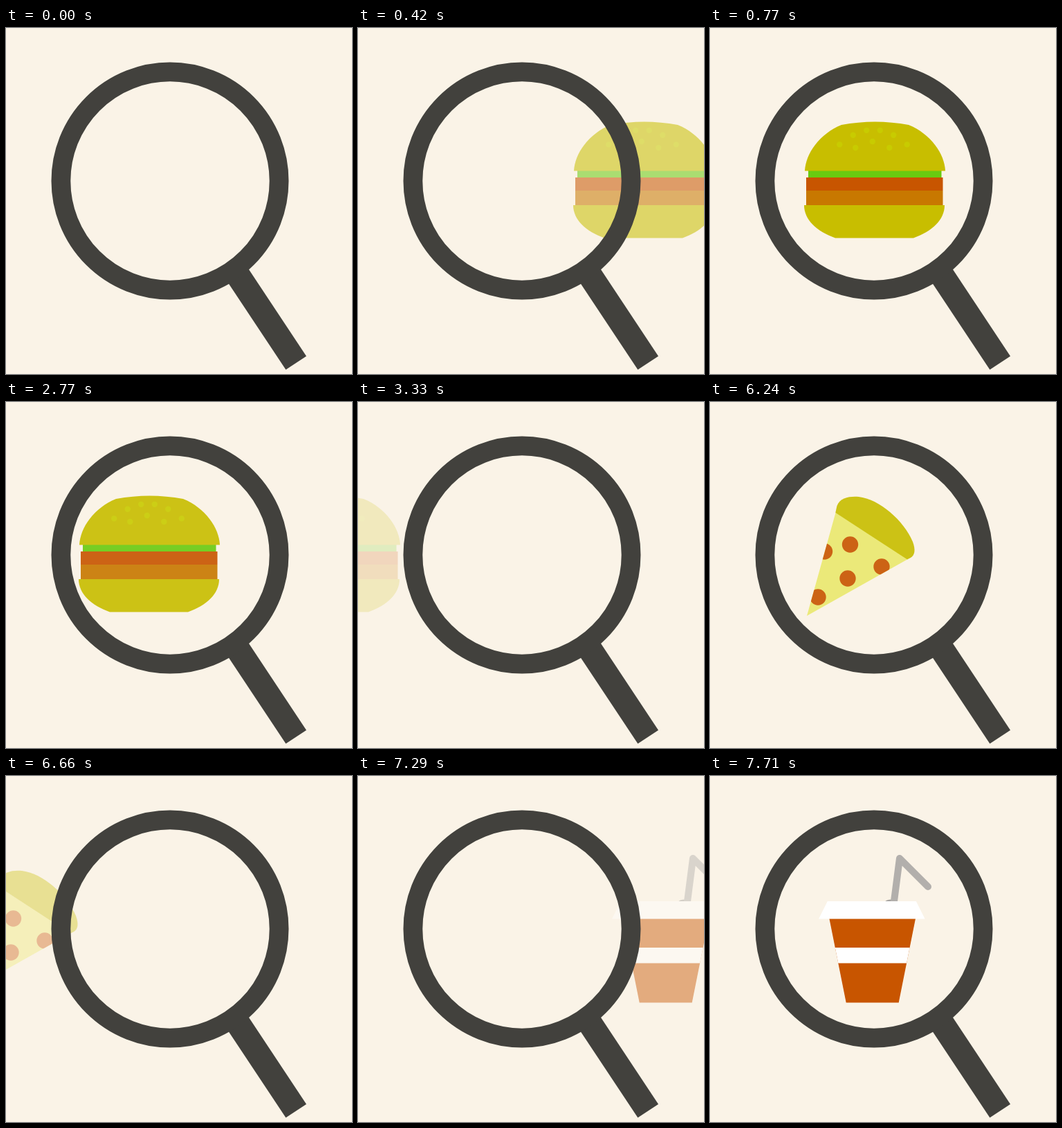
Animation of 500 by 500 pixels, one loop 8 s. Source, as an HTML page:

```html
<!DOCTYPE html>
<html lang="en">
<head>
<meta charset="utf-8">
<title>Food search</title>
<style>
  html, body { margin: 0; width: 100%; height: 100%; overflow: hidden; background: #faf3e7; }
  svg { display: block; width: 100vw; height: 100vh; }
  .item { opacity: 0; }
  .bun { fill: #c8be00; }
  .meat { fill: #c85500; }
  .white { fill: #fff; }
</style>
</head>
<body>
<svg viewBox="0 0 500 500">
  <defs>
    <path id="wedge" d="M213.5 160 L318 227 L172 309Z"/>
    <clipPath id="slice"><use href="#wedge"/></clipPath>
  </defs>

  <g class="item" id="burger">
    <rect x="142" y="205" width="192.5" height="13" fill="#69cb10"/>
    <path class="bun" d="M137 206.5 C138 182 158 153 190 140 Q238.5 131 287 140 C319 153 339 182 340 206.5Z"/>
    <g id="seeds" fill="#c8cb00"></g>
    <rect x="139" y="235" width="197.5" height="23" fill="#c87800"/>
    <rect class="meat" x="139" y="216" width="197.5" height="19"/>
    <path class="bun" d="M136 256 H339 C339 277 321 294 294 303.4 H181 C154 294 136 277 136 256Z"/>
  </g>

  <g class="item" id="pizza">
    <use href="#wedge" fill="#eae96e"/>
    <g id="toppings" class="meat" clip-path="url(#slice)"></g>
    <path class="bun" d="M213.3 160 L215.5 150 C220 138 234 136 247 137 C276 140 312 171 325 202 C329 213 328.5 221 322 225 L317 227.5Z"/>
  </g>

  <g class="item" id="cup">
    <ellipse cx="262" cy="182" rx="9" ry="3.5" fill="#a5a29f"/>
    <path d="M266 181 L274 119 L315 160" fill="none" stroke="#b2afac" stroke-width="10" stroke-linecap="round" stroke-linejoin="round"/>
  </g>

  <g fill="none" stroke="#42413d">
    <line x1="330.2" y1="349.8" x2="419.2" y2="484" stroke-width="35.6"/>
    <circle cx="237" cy="221" r="157.6" stroke-width="27.8"/>
  </g>
</svg>
<script>
  const LOOP = 8000, SLIDE = 770, LEAVE = 2700, CYCLE = LEAVE + SLIDE;
  const STEPS = 11, ENTER_STEP = 35;
  const $ = id => document.getElementById(id);
  const add = (id, markup) => $(id).insertAdjacentHTML('beforeend', markup);
  const dot = (id, x, y, r) => add(id, `<circle cx="${x}" cy="${y}" r="${r}"/>`);

  // A row of seeds that bends down towards both ends.
  function seedRow(count, gap, cx, top, bend) {
    for (let i = 0; i < count; i++) {
      const dx = (i - (count - 1) / 2) * gap;
      dot('seeds', cx + dx, top + bend * dx * dx, 4.2);
    }
  }

  // A symmetric band whose half width changes evenly with height.
  function band(cls, top, bottom, half, cx = 234.7) {
    const [a, b] = [half(top), half(bottom)];
    add('cup', `<path class="${cls}" d="M${cx - a} ${top}H${cx + a}L${cx + b} ${bottom}H${cx - b}Z"/>`);
  }

  // Slides in from the right, rests, then slides out to the left.
  function slide(id, start, exitStep) {
    const enterX = STEPS * ENTER_STEP, exitX = -STEPS * exitStep;
    const key = (time, x, opacity, easing = 'linear') =>
      ({ offset: time / LOOP, transform: `translateX(${x}px)`, opacity, easing });
    const jump = `steps(${STEPS}, end)`;
    const keys = [
      key(0, enterX, 0),
      key(start, enterX, 0, jump),
      key(start + SLIDE, 0, 1),
      key(start + LEAVE, 0, 1, jump),
      key(start + CYCLE, exitX, 0)
    ].filter(k => k.offset < 1);
    keys.push({ ...keys.at(-1), offset: 1 });
    const anim = $(id).animate(keys, { duration: LOOP, iterations: Infinity, delay: -1 });
    anim.startTime = 0;
  }

  seedRow(6, 19.5, 236, 147, 0.009);
  seedRow(3, 24.5, 234.8, 164, 0.015);
  for (const [x, y] of [[234.5, 206], [197.5, 216], [231, 255], [280, 238], [188, 282]])
    dot('toppings', x, y, 11.7);

  const body = y => 62.3 - (y - 206) / 5;
  band('meat', 206, 327.5, body);
  band('white', 248, 270.5, body);
  band('white', 181, 206.5, y => 64 + (y - 181) / 2, 233.8);

  ['burger', 'pizza', 'cup'].forEach((id, i) => slide(id, i * CYCLE, 31 + i));
</script>
</body>
</html>
```
